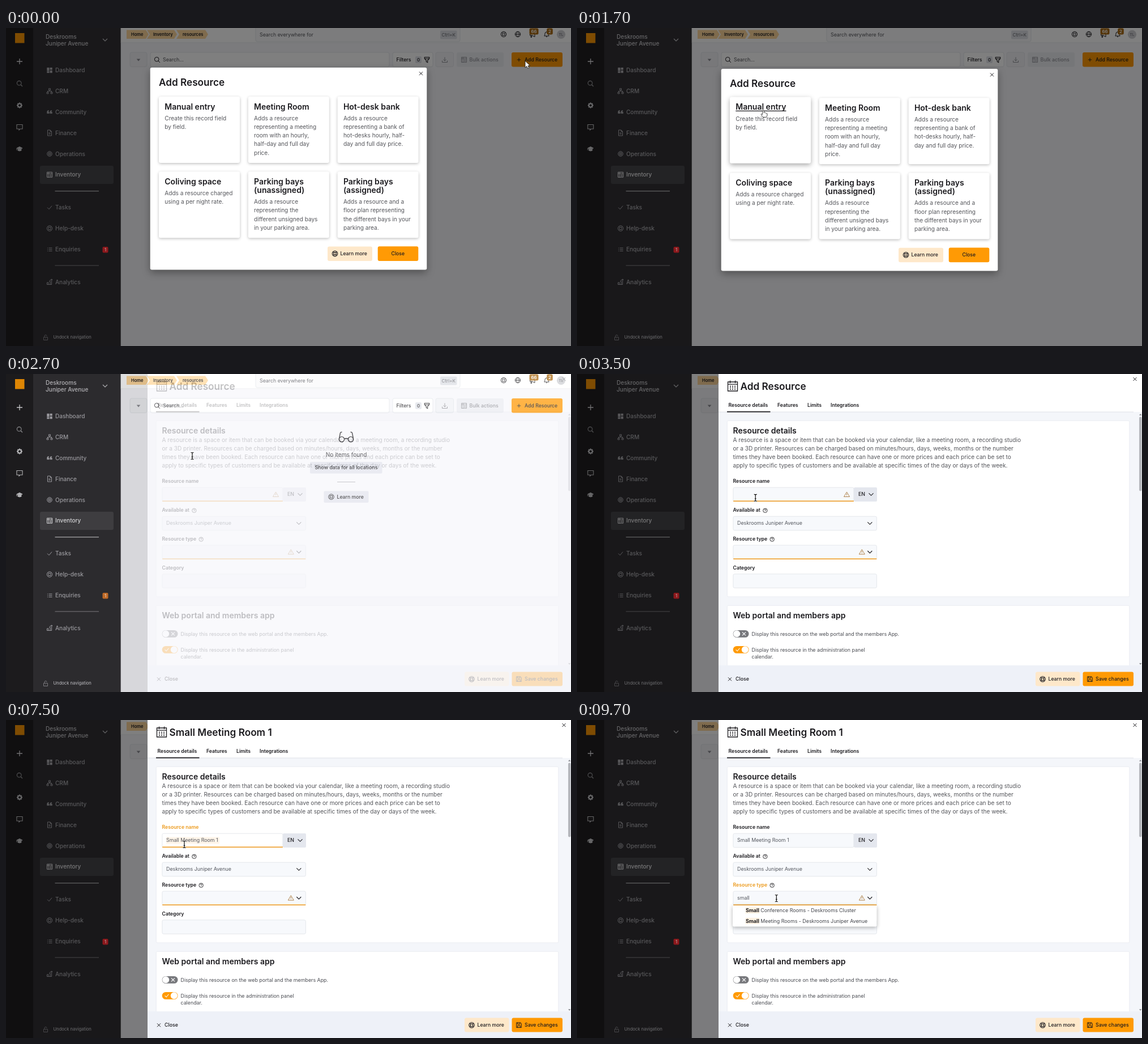
Recreate the animation shown at these times as an HTML page with a canvas. Size 998 by 561 pixels, loop 10000 ms.

```html
<!DOCTYPE html>
<html lang="en">
<head>
<meta charset="utf-8">
<title>Add a resource</title>
<style>
html, body { margin: 0; width: 100%; height: 100%; overflow: hidden; background: #fff; }
canvas { display: block; width: 998px; height: 561px; }
</style>
</head>
<body>
<canvas id="stage"></canvas>
<script>
const W = 998, H = 561, LOOP = 10000, STEP = 100, PANEL_X = 250;
const ORANGE = '#ff9a05', PEACH = '#fee8ca', INK = '#1c1b1f', GREY = '#55565b', LINE = '#dfe2e8';
const dpr = window.devicePixelRatio || 1;

function surface(el) {
  el.width = W * dpr;
  el.height = H * dpr;
  const ctx = el.getContext('2d');
  ctx.setTransform(dpr, 0, 0, dpr, 0, 0);
  return ctx;
}

const screen2d = surface(document.getElementById('stage'));
const panel2d = surface(document.createElement('canvas'));
let c = screen2d;

const clamp = v => Math.max(0, Math.min(1, v));
const span = (t, a, b) => clamp((t - a) / (b - a));
const smooth = p => p * p * (3 - 2 * p);
const easeOut = p => 1 - (1 - p) ** 3;
const mix = (a, b, p) => a + (b - a) * p;
const mixRgb = (a, b, p) => `rgb(${a.map((v, i) => Math.round(mix(v, b[i], p)))})`;

function text(s, x, cy, size = 8.8, weight = 400, color = INK, align = 'left') {
  c.font = `${weight} ${size}px Inter, sans-serif`;
  c.textAlign = align;
  c.fillStyle = color;
  c.fillText(s, x, cy + size * 0.36);
  return c.measureText(s).width;
}

function box(x, y, w, h, fill, r = 0, stroke, width = 0.8) {
  c.beginPath();
  c.roundRect(x, y, w, h, r);
  if (fill) { c.fillStyle = fill; c.fill(); }
  if (stroke) { c.strokeStyle = stroke; c.lineWidth = width; c.stroke(); }
}

function shadowBox(x, y, w, h, blur, dy, alpha, r = 3) {
  c.save();
  c.shadowColor = `rgba(0,0,0,${alpha})`;
  c.shadowBlur = blur * dpr;
  c.shadowOffsetY = dy * dpr;
  box(x, y, w, h, '#fff', r);
  c.restore();
}

// Icon paths are centred on 0,0 and about ten units wide.
const ring = r => `M${r} 0A${r} ${r} 0 1 1 ${-r} 0A${r} ${r} 0 1 1 ${r} 0`;
const ICONS = {
  plus: 'M-5 0H5M0-5V5',
  cross: 'M-3-3L3 3M3-3L-3 3',
  down: 'M-4-2L0 2L4-2',
  check: 'M-4 0L-1 3L4-3',
  search: 'M3 -.8A3.8 3.8 0 1 1 -4.6 -.8A3.8 3.8 0 1 1 3 -.8M2 2L5 5',
  buoy: ring(4.7) + ring(2.3) + 'M-3.3-3.3L-1.6-1.6M3.3-3.3L1.6-1.6M-3.3 3.3L-1.6 1.6M3.3 3.3L1.6 1.6',
  globe: ring(4.7) + 'M-4.7 0H4.7M0-4.7C-3-2-3 2 0 4.7C3 2 3-2 0-4.7',
  gear: ring(3) + 'M0-5V-3M0 5V3M-5 0H-3M5 0H3M-3.5-3.5L-2-2M3.5-3.5L2-2M-3.5 3.5L-2 2M3.5 3.5L2 2',
  chat: 'M-5-4.5H5V3H1L-1 5V3H-5ZM-2-.8H-1.5M1.5-.8H2',
  cap: 'M-5-1L0-3.5L5-1L0 1.5ZM-3 1V3Q0 5 3 3V1M-5-1V2.5',
  grid: 'M-4.5-4.5H-.7V.8H-4.5ZM.8-4.5H4.5V-1H.8ZM-4.5 2H-.7V4.5H-4.5ZM.8.5H4.5V4.5H.8Z',
  nodes: 'M-1.5-4.5H1.5V-2H-1.5ZM-5 2H-2V4.5H-5ZM2 2H5V4.5H2ZM0-2V0M-3.5 2V0H3.5V2',
  quote: 'M-4.5 2.5V0Q-4.5-3-1.5-3V-1.5Q-2.5-1.5-2.5 0H-.7V2.5ZM.7 2.5V0Q.7-3 3.7-3V-1.5Q2.7-1.5 2.7 0H4.5V2.5Z',
  file: 'M-3.5-5H1L3.5-2.5V5H-3.5ZM1-5V-2.5H3.5M-1.7 0H1.7M-1.7 2H1.7',
  chip: ring(4.3) + 'M-2-2H2V2H-2ZM-1 0H1',
  table: 'M-4.5-4.5H4.5V4.5H-4.5ZM-4.5-2H4.5M-1.8-4.5V4.5M0 .3H3.2M0 2.5H3.2',
  list: 'M-4-2.7H-3M-1.5-2.7H4.5M-4 0H-3M-1.5 0H4.5M-4 2.7H-3M-1.5 2.7H4.5',
  chart: 'M-4.5 1H-2V4.5H-4.5ZM-1-1H1.2V4.5H-4.5M1.2 4.5H3.6V-2.5M0-2.5L4.5-4.5M2.5-4.8L4.6-4.5L4-2.6',
  lock: 'M-3.5-.5H3.5V4.5H-3.5ZM-2-.5V-2.5A2 2 0 0 1 2-2.5M0 1.5V2.5',
  funnel: 'M-4.2-4.5H4.2V-2L1.2 1V4.8L-1.2 3.5V1L-4.2-2ZM-4.2-2H4.2',
  load: 'M0-4.5V2M-2.5-.5L0 2L2.5-.5M-4.5 1.5V4.5H4.5V1.5',
  horn: 'M-4.5-1.5H-1L4-4.5V3.5L-1 1H-4.5ZM-3 1V4.5H-1.5V1',
  bell: 'M-4.2 2.5Q-3 1-3-1.5A3 3 0 0 1 3-1.5Q3 1 4.2 2.5ZM-1 4H1M0-5V-4.5',
  calendar: 'M-8.5-7H8.5V9H-8.5ZM-8.5-2.8H8.5M-4.5-9.5V-5M4.5-9.5V-5M-5 .5H-3M-1 .5H1M3 .5H5M-5 3.2H-3M-1 3.2H1M3 3.2H5M-5 6H-3M-1 6H1M3 6H5',
  warn: 'M0-4.4L5 4H-5ZM0-1.6V1.2M0 2.4V2.9',
  help: ring(3.7) + 'M-1.3-.8Q-1.2-2 0-2Q1.3-2 1.3-.9Q1.3-.2 0 .4V.9M0 1.8V2.1',
  save: 'M-4.3-4.3H2.8L4.3-2.8V4.3H-4.3ZM-2.3-4.3V-1.5H1.8V-4.3M-2.3 4.3V1H2.3V4.3',
  glasses: 'M-12.7 4L-10.5-7Q-10-8.8-7.5-8.5M12.7 4L10.5-7Q10-8.8 7.5-8.5M-3.4 4.2A4.6 4.6 0 1 1-12.6 4.2A4.6 4.6 0 1 1-3.4 4.2M12.6 4.2A4.6 4.6 0 1 1 3.4 4.2A4.6 4.6 0 1 1 12.6 4.2M-3.4 3.5Q0 2 3.4 3.5',
  arrow: 'M0 0V12L2.8 9.4L4.7 13.4L6.8 12.4L5 8.6H8.8Z',
  hand: 'M-1.3 6V.8Q0-.8 1.3.8V4.5Q2.6 3.7 3.7 5Q5 4.4 5.7 5.8Q7.3 5.4 7.3 7.2V9.5Q7 11 6 13H-.5Q-2.5 10.5-4 8Q-4 5.8-1.3 8Z',
  beam: 'M-2.5-6Q-.4-6 0-5Q.4-6 2.5-6M0-5V5M-2.5 6Q-.4 6 0 5Q.4 6 2.5 6M-1.3 1.8H1.3'
};
for (const k in ICONS) ICONS[k] = new Path2D(ICONS[k]);

function icon(name, x, y, color = INK, width = 1, fill, scale = 1) {
  c.save();
  c.translate(x, y);
  c.scale(scale, scale);
  if (fill) { c.fillStyle = fill; c.fill(ICONS[name]); }
  if (color) { c.strokeStyle = color; c.lineWidth = width; c.stroke(ICONS[name]); }
  c.restore();
}

const MENU = [
  ['grid', 'Dashboard', 74.6], ['nodes', 'CRM', 111.3], ['quote', 'Community', 148.3],
  ['file', 'Finance', 185], ['chip', 'Operations', 222], ['table', 'Inventory', 258.8],
  ['check', 'Tasks', 316.7], ['buoy', 'Help-desk', 353.5], ['list', 'Enquiries', 390.7], ['chart', 'Analytics', 448]
];

function sidebar() {
  const soft = '#b1b0b5';
  box(0, 0, 48, H, '#201f21');
  box(48, 0, 154.5, H, '#323135');
  box(16, 9, 16.5, 17.5, ORANGE);
  icon('plus', 24, 59, '#e4e4e6', 1.3);
  icon('search', 24, 98, '#a5a5a9', 1.1);
  icon('gear', 24, 136.5, '#cfcfd2', 2);
  icon('chat', 24, 175, '#cfcfd2', 1.1);
  icon('cap', 24, 213, '#cfcfd2', 1, '#cfcfd2');
  text('Deskrooms', 70, 15, 10.1, 500, '#cecdd1');
  text('Juniper Avenue', 70, 27.5, 10.1, 500, '#cecdd1');
  icon('down', 175, 21, '#cecdd1', 1.1);
  box(60, 243, 130, 32, '#47464a', 3);
  for (const [name, label, y] of MENU) {
    const on = label === 'Inventory';
    const solid = name === 'grid' || name === 'quote';
    icon(name, 77, y, on ? '#f1f1f3' : soft, solid ? 0.4 : 1, solid ? soft : null);
    text(label, 87, y, 10.05, 500, on ? '#f4f4f6' : soft);
  }
  box(86.5, 287.3, 77.5, 1, '#e5e5e7');
  box(86.5, 418.5, 77.5, 1, '#8d8c91');
  icon('lock', 70, 546, '#8d8c91', 1);
  text('Undock navigation', 83.5, 545.3, 7.55, 500, '#c4c3c8');
}

function crumb(x, w, label, first) {
  c.beginPath();
  c.moveTo(x, 3.5);
  c.lineTo(x + w, 3.5);
  c.lineTo(x + w + 5, 11.2);
  c.lineTo(x + w, 19);
  c.lineTo(x, 19);
  if (!first) c.lineTo(x + 5, 11.2);
  c.closePath();
  c.fillStyle = '#ffd89c';
  c.fill();
  text(label, x + (first ? 8 : 11), 11.3, 7.55, 600);
}

function count(x, y, w, label) {
  box(x - w / 2, y - 5.5, w, 11, '#a9680f', 2.5);
  text(label, x, y, 8, 600, '#fff', 'center');
}

function page() {
  box(202.5, 0, W, H, '#f7f7fb');
  box(202.5, 0, W, 26, '#fff');
  box(202.5, 25.5, W, 0.8, '#e6e7ec');
  crumb(213, 34, 'Home', true);
  crumb(249, 48, 'Inventory');
  crumb(301, 51, 'resources');
  box(441, -6, 361, 30, '#fafafc', 3, LINE);
  text('Search everywhere for', 448, 11.5, 8.8, 400, GREY);
  box(767, 4.5, 29.5, 15, '#dddfe5', 2);
  text('Ctrl+K', 781.7, 12, 8, 400, '#65666c', 'center');
  icon('buoy', 879, 11);
  icon('globe', 904, 11);
  icon('horn', 930, 12);
  icon('bell', 955, 11.5);
  count(932.5, 6, 16, '66');
  count(960.5, 6, 10.5, '2');
  c.beginPath();
  c.arc(980.5, 11.3, 7.6, 0, 7);
  c.fillStyle = '#cfd0d4';
  c.fill();
  text('TL', 980.5, 11.5, 6.5, 500, '#707177', 'center');

  box(219, 43, 30, 25.5, '#f1f2f6', 3, LINE);
  c.beginPath();
  c.moveTo(230.7, 54.5); c.lineTo(237.3, 54.5); c.lineTo(234, 58.5);
  c.fillStyle = '#8b8c92';
  c.fill();
  box(255, 43, 422, 25.5, '#fff', 3, LINE);
  icon('search', 267, 56, INK, 1);
  text('Search...', 277, 56, 8.8, 400, GREY);
  box(683, 43, 71, 25.5, '#fff', 3, LINE);
  text('Filters', 689.5, 56, 8.8, 500);
  box(723, 50, 11, 12, '#e1e3ea', 2);
  text('0', 728.5, 56, 8, 500, INK, 'center');
  icon('funnel', 743.5, 56, INK, 1.1);
  box(759, 43, 31.5, 25.5, '#f1f2f6', 3, LINE);
  icon('load', 775, 56, '#909197');
  box(796, 43, 83, 25.5, '#ecedf2', 3);
  icon('table', 809, 56, '#909197', 0.9);
  text('Bulk actions', 818.5, 56, 8.8, 500, '#909197');
  box(893, 43, 90, 25.5, ORANGE, 3);
  icon('plus', 906, 56, INK, 1.4, null, 0.65);
  text('Add Resource', 916, 56, 8.7, 500);

  icon('glasses', 601, 111, INK, 1.4);
  text('No items found', 601, 142.3, 10.1, 400, '#333338', 'center');
  box(537, 155, 127.5, 20.5, '#e3e5ee', 2);
  text('Show data for all locations', 601, 165.3, 8.8, 500, INK, 'center');
  box(585, 190, 32, 0.8, '#a5a6ac');
  box(561.5, 206.5, 79, 20.5, '#e3e5ee', 2);
  icon('buoy', 574.5, 216.7);
  text('Learn more', 584.5, 216.7, 8.7, 500);
}

// The unread badge turns from amber to red as the page dims.
function badge(p) {
  box(170.5, 386, 10, 10.5, mixRgb([208, 134, 42], [140, 24, 28], p), 2);
  text('1', 175.5, 391.3, 7.5, 500, mixRgb([255, 240, 220], [190, 160, 160], p), 'center');
}

const CARDS = [
  [['Manual entry'], ['Create this record field', 'by field.']],
  [['Meeting Room'], ['Adds a resource', 'representing a meeting', 'room with an hourly,', 'half-day and full day', 'price.']],
  [['Hot-desk bank'], ['Adds a resource', 'representing a bank of', 'hot-desks hourly, half-', 'day and full day price.']],
  [['Coliving space'], ['Adds a resource charged', 'using a per night rate.']],
  [['Parking bays', '(unassigned)'], ['Adds a resource', 'representing the', 'different unsigned bays', 'in your parking area.']],
  [['Parking bays', '(assigned)'], ['Adds a resource and a', 'floor plan representing', 'the different bays in your', 'parking area.']]
];

function cardAt(p) {
  const col = Math.floor((p.x - 270) / 158), row = Math.floor((p.y - 123) / 132);
  const inside = col >= 0 && col < 3 && row >= 0 && row < 2 && (p.x - 270) % 158 < 143 && (p.y - 123) % 132 < 117;
  return inside ? row * 3 + col : -1;
}

function dialog(dy, hover) {
  c.save();
  c.translate(0, dy);
  shadowBox(254.7, 72, 488.6, 356.6, 14, 5, 0.35);
  text('Add Resource', 270, 97.7, 17.2, 600);
  icon('cross', 733, 82.5, INK, 1);
  CARDS.forEach(([title, body], i) => {
    const on = i === hover;
    const x = 270 + (i % 3) * 157.8, y = 123.2 + (i > 2 ? 132.2 : 0) - (on ? 1.4 : 0);
    shadowBox(x, y, 143, 117, on ? 9 : 5, on ? 3 : 1.5, on ? 0.34 : 0.26);
    title.forEach((s, k) => {
      const w = text(s, x + 10.3, y + 17.6 + k * 15.2, 14, 600);
      if (on) box(x + 10.3, y + 24 + k * 15.2, w, 1.1, INK);
    });
    const top = y + 38.1 + (title.length - 1) * 15.2;
    body.forEach((s, k) => text(s, x + 10.3, top + k * 15.25, 10.08, 400, GREY));
  });
  box(568, 387.8, 79, 25.5, PEACH, 3);
  icon('buoy', 581, 400.3, INK, 1.2);
  text('Learn more', 590.5, 400.3, 8.7, 500);
  box(656.7, 387.5, 71.6, 25.8, ORANGE, 3);
  text('Close', 692.3, 400.3, 8.7, 500, INK, 'center');
  c.restore();
}

const NAME = 'Small Meeting Room 1';
const NAME_KEYS = [43, 44, 45, 46, 47, 48, 49, 51, 52, 53, 55, 56, 59, 62, 63, 64, 65, 66, 68, 70];
const TYPE = 'small';
const TYPE_KEYS = [89, 90, 91, 92, 93];
const typed = (s, keys, t) => s.slice(0, keys.filter(k => t >= k * 100).length);

const ABOUT = [
  'A resource is a space or item that can be booked via your calendar, like a meeting room, a recording studio',
  'or a 3D printer. Resources can be charged based on minutes/hours, days, weeks, months or the number',
  'times they have been booked. Each resource can have one or more prices and each price can be set to',
  'apply to specific types of customers and be available at specific times of the day or days of the week.'
];

function field(label, y, w, { value = '', active, underline, caret, help, marked, fill = '#f7f9fc' } = {}) {
  const lw = text(label, 275.5, y - 10.7, 8.7, 600, active ? '#ec9a1c' : INK);
  if (help) icon('help', 275.5 + lw + 8.5, y - 10, INK, 0.9);
  box(275.9, y + 0.4, w, 24.6, fill, 2.5, LINE);
  if (underline) box(276, y + 23.8, w, 1.5, '#f09a1e', 0.7);
  if (marked) box(283, y + 6.7, 94, 12, '#fff5e9');
  const vw = text(value, 283, y + 12.5, 8.85, 400, '#55585f');
  if (caret) box(283 + vw, y + 7.2, 0.9, 11, INK);
}

function toggle(y, on) {
  box(275.7, y - 6.3, 27.8, 12.8, on ? ORANGE : '#77787c', 6.4);
  c.beginPath();
  c.arc(on ? 296.8 : 282.2, y, 6, 0, 7);
  c.fillStyle = '#fff';
  c.fill();
  icon(on ? 'check' : 'cross', on ? 284 : 295, y, '#fff', 1.2, null, on ? 0.85 : 1);
}

function options(n) {
  shadowBox(275, 327, 254.5, 37.5, 7, 2, 0.3, 2);
  const rows = ['Small Conference Rooms - Deskrooms Cluster', 'Small Meeting Rooms - Deskrooms Juniper Avenue'];
  rows.forEach((s, i) => {
    const y = 336 + i * 18.4, head = s.slice(0, n);
    c.font = '700 8.85px Inter, sans-serif';
    box(297.5, y - 5.5, c.measureText(head).width + 1, 11, '#fff3e2');
    const w = text(head, 298, y, 8.85, 700);
    text(s.slice(n), 298 + w, y, 8.85, 400, '#44464c');
  });
}

function drawer(t) {
  const name = typed(NAME, NAME_KEYS, t), type = typed(TYPE, TYPE_KEYS, t);
  const onName = t >= 3700 && t < 8500, onType = t >= 8500;
  box(PANEL_X, 0, 748, H, '#f4f6fa');
  box(PANEL_X, 0, 748, 67, '#fff');
  box(PANEL_X, 66.6, 733, 0.8, '#e0e2e7');
  icon('calendar', 275, 21, INK, 1.3);
  text(name || 'Add Resource', 288.5, 21.8, 17.2, 600);
  icon('cross', 985.5, 9, INK, 1);
  text('Resource details', 267.5, 55, 8.7, 600);
  text('Features', 354, 55, 8.7, 600);
  text('Limits', 407, 55, 8.7, 600);
  text('Integrations', 448, 55, 8.7, 600);
  box(265, 65.8, 76.5, 1.6, INK);

  box(265.3, 82.4, 710.5, 310.5, '#fff', 2, '#e8eaef');
  text('Resource details', 275.5, 100.3, 14, 600);
  ABOUT.forEach((s, i) => text(s, 275.5, 115.9 + i * 15.2, 10.08, 400, GREY));

  field('Resource name', 199.8, 213, {
    value: name, active: onName, underline: !onType, caret: onName && t < 7500,
    marked: t >= 7500 && t < 7900, fill: onName ? '#fff' : '#f7f9fc'
  });
  if (t < 3700) icon('warn', 476.5, 212.5, '#a9783c', 0.9);
  box(489, 200, 41, 25, '#e4e7ee', 2);
  text('EN', 497, 212.3, 8.8, 500);
  icon('down', 519.5, 212.3, INK, 1.1);

  field('Available at', 250.8, 253.5, { value: t > 2600 ? 'Deskrooms Juniper Avenue' : '', help: true });
  icon('down', 517.3, 263.3, INK, 1.1);
  field('Resource type', 301.6, 253.5, {
    value: type, active: onType, underline: true, caret: onType && t < 9700, help: true
  });
  icon('warn', 503.3, 314, '#a9783c', 0.9);
  icon('down', 517.3, 314, INK, 1.1);
  field('Category', 352.4, 253.5);
  if (type) options(type.length);

  box(265.3, 408.4, 710.5, 120, '#fff', 2, '#e8eaef');
  text('Web portal and members app', 275.5, 426.3, 14, 600);
  toggle(458.3, false);
  text('Display this resource on the web portal and the members App.', 308.5, 458.5, 8.85, 400, '#4a4c52');
  toggle(486.3, true);
  text('Display this resource in the administration panel', 308.5, 486.5, 8.85, 400, '#4a4c52');
  text('calendar.', 308.5, 499, 8.85, 400, '#4a4c52');

  box(993, 75.5, 4.4, 131, '#b4b6bb', 2.2);
  c.fillStyle = '#8e9096';
  for (const [y, d] of [[73, -3], [510, 3]]) {
    c.beginPath();
    c.moveTo(993, y); c.lineTo(997.4, y); c.lineTo(995.2, y + d);
    c.fill();
  }

  box(PANEL_X, 514, 748, 47, '#eef1f8');
  icon('cross', 270, 538.3, INK, 1);
  text('Close', 280, 538.2, 8.8, 500);
  box(810, 525.5, 78.5, 25, PEACH, 3);
  icon('buoy', 822.5, 538.2, INK, 1.2);
  text('Learn more', 832.5, 538.2, 8.7, 500);
  box(893.5, 525.5, 89.5, 25, ORANGE, 3);
  icon('save', 906, 538.2);
  text('Save changes', 916, 538.2, 8.75, 500);
}

// The panel fades in as one layer.
function fadeDrawer(t, alpha) {
  c = panel2d;
  c.clearRect(0, 0, W, H);
  drawer(t);
  c = screen2d;
  c.globalAlpha = alpha;
  c.drawImage(panel2d.canvas, 0, 0, W, H);
  c.globalAlpha = 1;
}

function pointer(t) {
  const legs = [
    [[917, 58], [329, 145], smooth(span(t, 700, 1600))],
    [[329, 145], [315, 220], easeOut(span(t, 3200, 3600))],
    [[315, 220], [352.3, 315], smooth(span(t, 7800, 8500))]
  ];
  const [a, b, p] = legs[t < 3200 ? 0 : t < 7800 ? 1 : 2];
  return { x: mix(a[0], b[0], p), y: mix(a[1], b[1], p) };
}

function drawPointer(t, p, hover) {
  const overGap = (p.y > 168 && p.y < 200) || (p.y > 226 && p.y < 250) || (p.y > 276 && p.y < 301);
  if (hover >= 0) icon('hand', p.x, p.y, '#222', 0.9, '#fff', 0.95);
  else if (t < 2600 || overGap) icon('arrow', p.x, p.y, '#222', 0.9, '#fff');
  else {
    icon('beam', p.x, p.y - 0.5, 'rgba(255,255,255,.8)', 2.4);
    icon('beam', p.x, p.y - 0.5, '#111', 1.2);
  }
}

function draw(t) {
  const p = pointer(t), open = t < 2600;
  const hover = open ? cardAt(p) : -1;
  const settle = easeOut(span(t, 0, 500));
  const fade = open ? 1 : smooth(span(t, 2500, 3100));
  page();
  sidebar();
  box(0, 0, open ? W : PANEL_X, H, `rgba(0,0,0,${0.5 * fade})`);
  badge(fade);
  if (open) dialog(-2.2 * (1 - settle), hover);
  else fadeDrawer(t, fade);
  drawPointer(t, p, hover);
}

const start = performance.now();
function tick() {
  const t = (performance.now() - start) % LOOP;
  draw(Math.floor(t / STEP) * STEP);
  requestAnimationFrame(tick);
}
tick();
</script>
</body>
</html>
```
